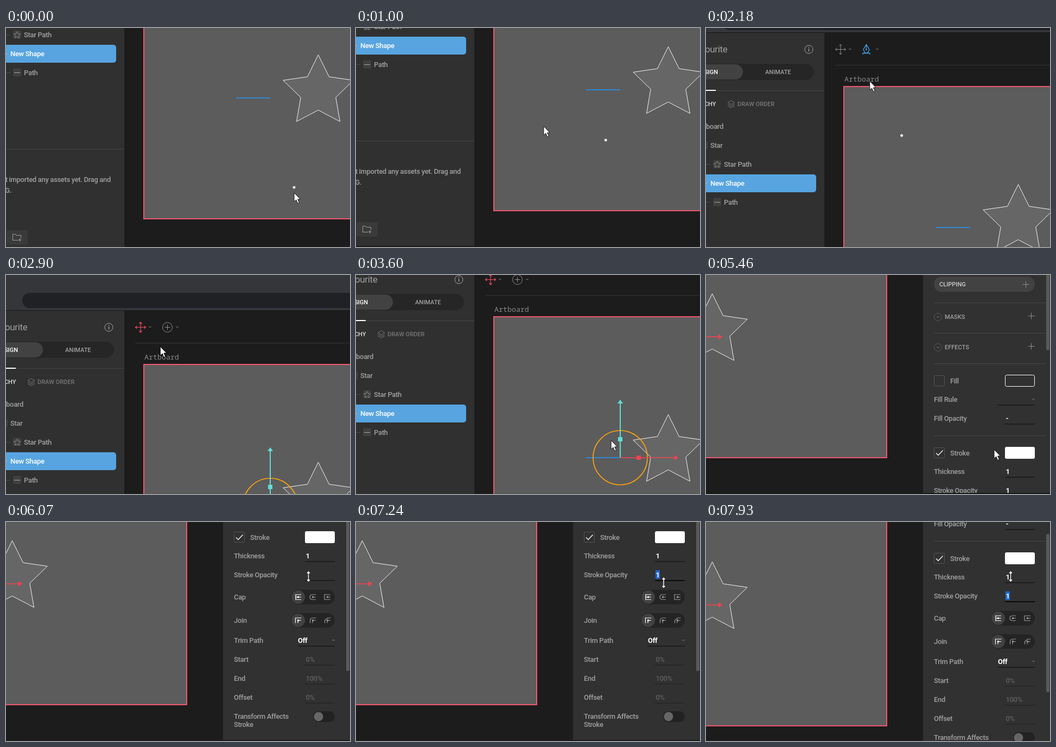
An HTML page that plays this animation: 634x404 px, repeating every 8 s.

```html
<!DOCTYPE html>
<html lang="en">
<head>
<meta charset="utf-8">
<title>Vector editor</title>
<style>
html, body { margin: 0; width: 100%; height: 100%; overflow: hidden; background: #1c1c1c; }
svg { display: block; width: 634px; height: 404px; }
text { font: 500 13px Roboto, sans-serif; letter-spacing: -.33px; fill: #a0a0a0; }
text.caps { font-size: 11px; letter-spacing: 0; }
text.end { text-anchor: end; }
text.title { font-size: 17px; font-weight: 400; }
text.mono { font: 13.3px "Noto Sans Mono", monospace; letter-spacing: 0; fill: #8a8a8a; }
.white { fill: #fff !important; }
.bold { font-weight: 700; }
.dim { fill: #606060; }
.line { fill: none; stroke: #8c8c8c; stroke-width: 1; }
</style>
</head>
<body>
<svg viewBox="0 0 634 404"><g id="camera"></g><g id="cursor"></g></svg>
<script>
const $ = id => document.getElementById(id);
const LOOP = 8000;

const rect = (x, y, w, h, fill, r = 0, extra = '') =>
  `<rect x="${x}" y="${y}" width="${w}" height="${h}" rx="${r}" fill="${fill}" ${extra}/>`;
// y is the vertical middle of the line
const text = (x, y, s, cls = '', extra = '') =>
  `<text x="${x}" y="${y + (cls.includes('caps') ? 4 : 4.7)}" class="${cls}" ${extra}>${s}</text>`;
const path = (d, stroke = '#8c8c8c', w = 1, fill = 'none') =>
  `<path d="${d}" stroke="${stroke}" stroke-width="${w}" fill="${fill}"/>`;
const circle = (x, y, r, fill, stroke = 'none', w = 1) =>
  `<circle cx="${x}" cy="${y}" r="${r}" fill="${fill}" stroke="${stroke}" stroke-width="${w}"/>`;
const chevron = (x, y) => path(`M${x - 2} ${y - 1}l2 2 2-2`, '#999');
const plus = (x, y, r) => path(`M${x - r} ${y}h${2 * r}M${x} ${y - r}v${2 * r}`, '#909090');
const group = (id, s, extra = '') => `<g id="${id}" ${extra}>${s}</g>`;

function star(cx, cy, R) {
  return 'M' + Array.from({ length: 10 }, (_, i) => {
    const a = i * Math.PI / 5, r = i % 2 ? R / 2 : R;
    return `${(cx + r * Math.sin(a)).toFixed(1)} ${(cy - r * Math.cos(a)).toFixed(1)}`;
  }).join('L') + 'Z';
}

function leftPanel() {
  const icon = y => rect(13, y - 7.5, 15, 15, '#404040', 3) + path(`M0 ${y + .5}h8`, '#4c4c4c');
  return rect(-10, 9, 228, 649, '#303030') +
    text(39.5, 40, 'Favourite', 'title end') +
    circle(189.5, 39.5, 7.5, 'none', '#aaa') + path('M189.5 38v5.5M189.5 35v1.5', '#aaa', 1.3) +
    rect(-60, 66, 259, 30, '#262626', 15) + rect(-60, 67, 128, 28, '#424242', 14) +
    text(22, 81, 'DESIGN', 'caps end white') + text(109, 81, 'ANIMATE', 'caps') +
    rect(0, 115, 218, 1, '#464646') + rect(0, 114, 18, 2, '#fff') +
    text(18.5, 140, 'HIERARCHY', 'caps end', 'style="fill:#ddd"') +
    path('M46.5 134l6.5 3.5-6.5 3.5-6.5-3.5zM40 140.5l6.5 3.5 6.5-3.5M40 143.5l6.5 3.5 6.5-3.5', '#777') +
    text(58, 140, 'DRAW ORDER', 'caps', 'style="fill:#777"') +
    text(32, 181, 'Artboard', 'end') +
    rect(-12, 209, 15, 15, '#404040', 3) + text(8, 216, 'Star') +
    icon(251) + path(star(20.5, 252, 6.5)) + text(33, 251, 'Star Path') +
    rect(-20, 270, 223, 33, '#57a4e0', 5) + path('M-3 286.5h5', '#9ccbf0') +
    text(8, 286, 'New Shape', 'white') +
    icon(321) + path('M15 321.5h11', '#aaa') + text(33, 321, 'Path') +
    rect(0, 462, 218, 1, '#464646') +
    text(193, 518, "You haven't imported any assets yet. Drag and", 'end') +
    text(10, 538, 'drop an SVG.', 'end') +
    rect(1, 612, 39, 27, '#3a3a3a', 4) +
    path('M22 630.5h-9.5v-11h5l1.5 2h8.500v5M25.500 627v6M22.500 630h6', '#a0a0a0');
}

function canvasArea() {
  const move = 'M248 30v19M238.500 39.500h19M245.500 33l2.500-3 2.500 3M245.500 46l2.500 3 2.500-3M241.500 37l-3 2.500 3 2.500M254.500 37l3 2.500-3 2.500';
  return rect(238, 68, 680, 1, '#343434') +
    group('penTools', path(move) +
      path('M295.500 30.500l-5.500 9 3 6.500h5l3-6.500zM295.500 31v8M289 49v-2.500h13v2.500', '#46a3f0', 1.3) +
      circle(295.5, 40, 1.3, '#46a3f0')) +
    group('moveTools', path(move, '#ee4a62', 1.2) +
      circle(297.5, 39.5, 9, 'none', '#8c8c8c') + plus(297.5, 39.5, 5)) +
    chevron(265.5, 39) + chevron(315.5, 39) +
    text(255, 94.5, 'Artboard', 'mono') +
    rect(254, 108, 643, 483, '#5c5c5c', 0, 'stroke="#f0566f" stroke-width="2"') +
    path(star(575.5, 356.5, 68), '#f4f4f4', 1, '#666') +
    rect(424, 367, 63, 2, '#2f88d4') +
    group('gizmo',
      circle(487, 368, 50, 'none', '#ffa30a', 1.7) +
      group('upArrow', rect(486, 267, 2, 101, 'currentColor') +
        rect(483, 330, 8, 8, 'currentColor') +
        path('M487 261l5 7h-10z', 'none', 0, 'currentColor')) +
      rect(487, 367.2, 101, 1.6, '#ee4450') + rect(517, 364, 8, 8, '#ee4450') +
      path('M594 368l-7 5v-10z', 'none', 0, '#ee4450')) +
    group('dot', circle(0, 0, 2.8, '#fff', '#444', .6));
}

function properties() {
  const rule = y => rect(420, y, 206, 1, '#474747');
  const under = (x, y, c = '#1e1e1e') => rect(x, y - 1, 606 - x, 2, c);
  const section = (y, s) => circle(427.5, y + .5, 7, 'none', '#5a5a5a') + chevron(427.5, y + .5) +
    text(440, y, s, 'caps') + plus(599.5, y - 1.5, 6);
  const check = y => rect(420.5, y - 9.5, 19, 19, 'none', 1, 'stroke="#555"');
  const field = (y, label, value, cls = 'white bold') =>
    text(420, y, label) + under(551, y + 11, cls === 'dim' ? '#282828' : '#1e1e1e') + text(552.5, y, value, cls);
  const segment = y => rect(525, y - 13.5, 81, 27, '#242424', 13.5) + circle(538.5, y, 12.5, '#414141');
  const tints = ['#fff', '#999', '#999'];
  const caps = ['M533 -4.500h11M533 0h11M533 4.500h11M534 -4.500v9',
    'M571 -4.500h-6q-5 0-5 4.500t5 4.500h6M565 0h6M565 -1v2', 'M598 -4.500h-11v9h11M592 0h6M592 -1v2'];
  const joins = ['M533.500 5v-9.500h11M538 5v-5h6M538 0v0', 'M560.500 5v-4q0-5.500 5-5.500h6M565 5v-5h6',
    'M587.500 5v-5l5-4.500h6M592 5v-5h6'];
  const icons = (y, list) => list.map((d, i) =>
    `<g transform="translate(0 ${y})">${path(d, tints[i], 1.2)}${rect([537, 564, 591][i], -1.5, 3, 3, tints[i])}</g>`).join('');

  return rect(420, 3, 186, 28, '#424242', 14) + text(430, 17, 'CLIPPING', 'caps', 'style="fill:#ccc"') +
    plus(589.5, 17.5, 6) + rule(51) + section(77, 'MASKS') + rule(107) + section(133, 'EFFECTS') + rule(163) +
    check(195) + text(450, 195, 'Fill') + rect(551.5, 184.5, 54, 21, 'none', 3, 'stroke="#fff"') +
    text(420, 229, 'Fill Rule') + under(538, 240) + chevron(603.5, 229.5) +
    field(264, 'Fill Opacity', '-') + rule(296) +
    check(328) + path('M424 328.500l4 4 8.500-9', '#fff', 1.3) + text(450, 328, 'Stroke') +
    rect(551, 317, 55, 22, '#fff', 3) +
    field(362, 'Thickness', '1') +
    group('picked', under(551, 408, '#0c0c0c') + rect(552, 389, 8, 16, '#2068cc')) +
    text(420, 397, 'Stroke Opacity') + group('opacityLine', under(551, 408)) +
    text(552.5, 397, '1', 'white bold', 'id="opacity"') +
    text(420, 438, 'Cap') + segment(438.5) + icons(438.5, caps) +
    text(420, 481, 'Join') + segment(481.5) + icons(481.5, joins) +
    text(420, 518, 'Trim Path') + text(538, 518, 'Off', 'white bold') + under(538, 529) + chevron(603.5, 518) +
    field(553, 'Start', '0%', 'dim') + field(588, 'End', '100%', 'dim') + field(623, 'Offset', '0%', 'dim') +
    text(420, 658, 'Transform Affects') + text(420, 673, 'Stroke') +
    rect(566, 649, 40, 20, '#222', 10) + circle(576, 659, 8.5, '#666');
}

$('camera').innerHTML =
  rect(-10, -70, 1300, 760, '#1c1c1c') +
  canvasArea() + leftPanel() +
  group('right', rect(400, -245, 240, 650, '#313131') +
    group('scroll', properties()) +
    group('bar', rect(627, -153, 6, 292, '#5a5a5a', 3)), 'transform="translate(564 254)"') +
  rect(-10, 656, 1300, 40, '#1a1a1a') +
  rect(-10, -70, 1300, 78, '#35363a') + rect(30, -24, 1100, 28, '#202124', 14) + rect(-10, 8, 1300, 1, '#151515');

$('cursor').innerHTML =
  group('arrow', path('M0 0V16.500l3.800-3.500 2.900 6.600 2.800-1.200-2.900-6.400H11.500Z', '#111', 1, '#fff')) +
  group('resize', path('M0-10.500l4.300 5H1.200V5.500H4.300L0 10.500-4.300 5.500H-1.200V-5.500H-4.300Z', '#111', .8, '#fff'));

// Keys: time, x, y
const cameraKeys = [
  [-150, 0, -239], [80, 0, -239], [700, 0, -254], [1640, 0, -254], [2030, 0, -99], [2180, 0, 0],
  [2490, 0, 57], [3380, 0, 57], [3600, 0, -31], [3850, 0, -63], [4680, 0, -63], [5300, -564, -254],
  [7520, -564, -254], [7930, -564, -215]];
const cursorKeys = [
  [-150, 531, 294], [0, 531, 304], [80, 531, 304], [700, 461, 207], [850, 461, 207], [1300, 118, 130],
  [1620, 380, 101], [2030, 361, 100], [2180, 302, 98], [2490, 249, 96], [2800, 249, 97], [3380, 452, 298],
  [3600, 470, 305], [3850, 490, 303], [4610, 495, 302], [4720, 531, 304], [5300, 531, 310], [5460, 531, 322],
  [5880, 540, 300], [6070, 557.5, 100.5], [6230, 556, 107], [6400, 556, 107], [6690, 571, 108],
  [6840, 572, 111], [7200, 572, 111], [7240, 567, 112], [7480, 567, 112], [7620, 561.5, 100.5]];

function at(keys, t) {
  const i = keys.findIndex(k => k[0] > t);
  if (i < 0) return keys[keys.length - 1].slice(1);
  const a = keys[i - 1], b = keys[i], f = (t - a[0]) / (b[0] - a[0]);
  return [1, 2].map(n => a[n] + (b[n] - a[n]) * f);
}
const place = (id, x, y) => $(id).setAttribute('transform', `translate(${x} ${y})`);
const show = (id, on) => $(id).setAttribute('display', on ? 'inline' : 'none');

function draw(t) {
  const [cx, cy] = at(cameraKeys, t).map(Math.round);
  place('camera', cx, cy);
  place('cursor', ...at(cursorKeys, t));
  show('arrow', t < 6000);
  show('resize', t >= 6000);

  // The pen's dot trails the pointer
  const lag = t - 150, cam = at(cameraKeys, lag), tip = at(cursorKeys, lag);
  const dx = tip[0] - cam[0], dy = tip[1] - cam[1];
  place('dot', dx, dy);
  const moving = t >= 2720;
  show('dot', !moving && dx > 221 && dy > 72);
  show('penTools', !moving);
  show('moveTools', moving);
  show('gizmo', moving);
  $('upArrow').setAttribute('color', t < 4300 ? '#62dcd8' : '#66bfe2');

  const f = Math.min(1, Math.max(0, (t - 5520) / 440));
  const scroll = Math.round(300 * f * f * (3 - 2 * f));
  place('scroll', 0, -scroll);
  place('bar', 0, scroll * 136 / 300);
  const picked = t >= 6200;
  show('picked', picked);
  show('opacityLine', !picked);
  $('opacity').setAttribute('opacity', t > 6000 && !picked ? .3 : 1);
}

const start = performance.now();
function tick() {
  draw((performance.now() - start) % LOOP);
  requestAnimationFrame(tick);
}
tick();
</script>
</body>
</html>
```
